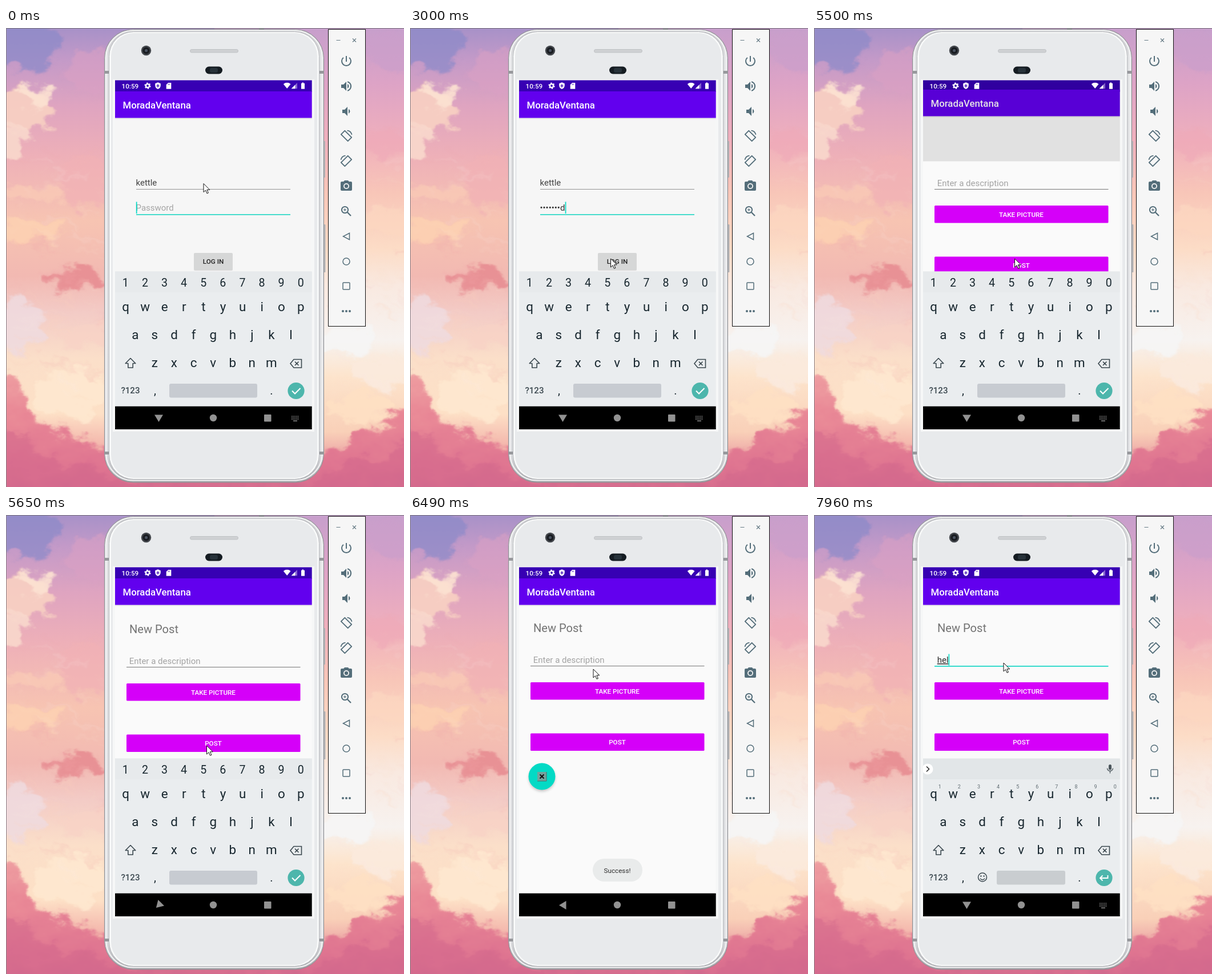
Write an HTML page that moves like this. It is 697 px wide and 804 px high and loops after 8000 ms.

```html
<!DOCTYPE html>
<html lang="en">
<head>
<meta charset="utf-8">
<title>Phone login and new post</title>
<style>
  html, body { margin: 0; width: 100%; height: 100%; overflow: hidden; background: #f4c2b4; }
  svg { display: block; width: 697px; height: 804px; }
  text { font-family: Roboto, "Liberation Sans", sans-serif; white-space: pre; }
  .med { font-weight: 500; }
  .mid { text-anchor: middle; }
</style>
</head>
<body>
<svg id="stage" viewBox="0 0 697 804" xmlns="http://www.w3.org/2000/svg"></svg>
<script>
const LOOP = 8000;
const TEAL = '#03dac5', SLATE = '#546e7a', INK = '#17262e', GLYPH = '#3b484f';

const rect = (x, y, w, h, fill, more = '') =>
  `<rect x="${x}" y="${y}" width="${w}" height="${h}" fill="${fill}" ${more}/>`;
const circle = (x, y, r, fill, more = '') =>
  `<circle cx="${x}" cy="${y}" r="${r}" fill="${fill}" ${more}/>`;
const path = (d, fill, more = '') => `<path d="${d}" fill="${fill}" ${more}/>`;
const line = (d, color, width = 1, more = '') =>
  path(d, 'none', `stroke="${color}" stroke-width="${width}" ${more}`);
const text = (x, y, size, fill, str, cls = '', more = '') =>
  `<text x="${x}" y="${y}" font-size="${size}" fill="${fill}" class="${cls}" ${more}>${str}</text>`;
const group = (id, inner) => `<g id="${id}">${inner}</g>`;
const gradient = (id, stops) => `<linearGradient id="${id}" x1="0" y1="0" x2="0" y2="1">` +
  stops.map(([o, c]) => `<stop offset="${o}" stop-color="${c}"/>`).join('') + '</linearGradient>';

function random(seed) {
  return () => (seed = (seed * 16807) % 2147483647) / 2147483647;
}

function defs() {
  return `<defs>
    ${gradient('skyL', [[0, '#a791c8'], [.07, '#c49ac8'], [.17, '#dfa4c0'], [.28, '#eeb0b8'], [.42, '#f7c4b2'],
      [.54, '#f2b9b2'], [.62, '#f3cbc6'], [.72, '#fbdfc9'], [.84, '#fde0c6'], [.92, '#f2b0a8'], [1, '#df748f']])}
    ${gradient('skyR', [[0, '#c79fcc'], [.12, '#dda3c6'], [.25, '#f0b0bc'], [.36, '#f8c6b8'], [.48, '#fcdcc6'],
      [.56, '#f9e9e0'], [.68, '#f7f2ef'], [.76, '#fde4cc'], [.88, '#f9d0b8'], [1, '#dc718f']])}
    ${gradient('hill', [[0, '#f0a5a4'], [.35, '#e98896'], [.7, '#de7390'], [1, '#c9648c']])}
    ${gradient('metal', [[0, '#c4c5c8'], [.06, '#dfe0e2'], [.94, '#dadbde'], [1, '#a5a6aa']])}
    <filter id="cloud" x="-20%" y="-20%" width="140%" height="140%" color-interpolation-filters="sRGB">
      <feGaussianBlur stdDeviation="3" result="soft"/>
      <feTurbulence type="fractalNoise" baseFrequency=".025 .035" numOctaves="4" seed="4"/>
      <feDisplacementMap in="soft" scale="55" xChannelSelector="R" yChannelSelector="G"/>
    </filter>
    <filter id="soft"><feGaussianBlur stdDeviation="2.5"/></filter>
    <clipPath id="screen"><rect x="191" y="91.5" width="344.7" height="611.5"/></clipPath>
    <clipPath id="body"><rect id="bodyClip" x="191" y="157" width="345" height="506"/></clipPath>
  </defs>`;
}

function wallpaper() {
  const clouds = [
    [5, 30, 85, 45, '#8c8ac8', .75], [150, 80, 45, 40, '#dba0c4', .6], [30, 145, 56, 40, '#f7cfc2', .95],
    [10, 200, 26, 34, '#f9d9cc', .9], [50, 118, 34, 18, '#fce3d2', .9], [140, 270, 40, 50, '#f1b1b6', .7],
    [40, 290, 60, 18, '#f9cab6', .8], [40, 355, 60, 22, '#fdd2b2', .85], [125, 442, 45, 18, '#e78a90', .85],
    [25, 525, 42, 42, '#efdbe0', .85], [140, 540, 45, 24, '#f8d2c6', .8], [115, 640, 60, 45, '#fee8d0', .9],
    [670, 40, 40, 30, '#cb9ecb', .7], [670, 200, 45, 22, '#efa9b8', .6], [665, 340, 45, 25, '#fcd8c0', .7],
    [600, 545, 50, 26, '#f6f5f5', .9], [660, 600, 50, 30, '#fbeadd', .9], [620, 665, 60, 24, '#fee0c4', .9]
  ].map(([x, y, rx, ry, c, o]) =>
    `<ellipse cx="${x}" cy="${y}" rx="${rx}" ry="${ry}" fill="${c}" opacity="${o}"/>`).join('');

  const rnd = random(71);
  let strokes = '';
  for (let i = 0; i < 70; i++) {
    const x = rnd() < .7 ? rnd() * 175 : 555 + rnd() * 142;
    const y = 200 + rnd() * 450, w = 15 + rnd() * 50;
    const c = ['#fde0cd', '#efa5a8', '#fbd0bd', '#f8e6e2'][i % 4];
    strokes += line(`M${x} ${y}q${w / 2} ${rnd() * 10} ${w} ${5 + rnd() * 18}`, c, 1 + rnd() * 4, 'opacity=".35"');
  }
  return rect(0, 0, 365, 804, 'url(#skyL)') + rect(365, 0, 332, 804, 'url(#skyR)') +
    `<g filter="url(#cloud)">${clouds}${strokes}
      ${path('M-40 590L15 610L40 670L85 705L130 722L190 750H540L590 730L640 700L700 668L740 660V850H-40Z', 'url(#hill)')}
      ${path('M-40 690L30 705L60 745L130 765L230 790V850H-40ZM530 800L600 760L740 725V850H530Z', '#d4688c', 'opacity=".55"')}
    </g>` + rect(0, 0, 697, 1, '#77727a') + rect(0, 0, 1, 804, '#8b8288');
}

function phone() {
  const bands = [75, 742].map(y => rect(172, y, 9, 5, '#97989c') + rect(548, y, 9, 5, '#97989c')).join('');
  return rect(555, 198, 4, 64, '#b5b5b8', 'rx="1"') + rect(555, 344, 4.5, 84, '#b5b5b8', 'rx="1"') +
    rect(443, 0, 9, 4, '#8d8e92') +
    rect(172.5, 2.5, 384, 793.5, 'url(#metal)', 'rx="50" stroke="#8b8c90"') +
    rect(175.5, 4.5, 378, 788, 'none', 'rx="47" stroke="#f4f4f5" stroke-width="2"') + bands +
    rect(180.5, 6.5, 368, 784, '#f8f9f9', 'rx="43" stroke="#b4b6ba"') +
    rect(184, 9, 361, 779, '#e8eaec', 'rx="40"') +
    rect(187, 90, 353, 617, '#f6f7f7') +
    circle(245.5, 39.5, 8.7, '#42464b') + circle(245.5, 39.5, 6, '#191c21') + circle(245.5, 39.5, 2.5, '#4a5360') +
    rect(322.5, 37.5, 84, 5.5, '#cfd1d3', 'rx="2.7" stroke="#b9bcbf" stroke-width=".8"') +
    rect(349, 67.5, 30, 13, '#151c22', 'rx="6.5"') + rect(357, 70, 14, 8, '#27323a', 'rx="3"');
}

function sideBar() {
  const at = (y, inner) => `<g transform="translate(584 ${y - 12})">${inner}</g>`;
  const turn = line('M2.8 9.3L9.3 2.8L21.2 14.7L14.7 21.2Z', SLATE, 1.9, 'stroke-linejoin="round"') +
    line('M13.5 2.6Q20 3.2 21.6 9.8', SLATE, 1.9);
  return rect(564.5, 2.5, 65, 520, '#f6f6f6', 'stroke="#111"') +
    line('M578.5 21.5h7M607 18.5l6 6m0-6l-6 6', '#687c86', 1.2) +
    at(58, path('M13 3h-2v10h2zM17.83 5.17l-1.42 1.42A7 7 0 1 1 7.58 6.58L6.17 5.17A9 9 0 1 0 17.83 5.17z', SLATE)) +
    at(102, path('M3 9v6h4l5 5V4L7 9zM16.5 12A4.5 4.5 0 0 0 14 8v8a4.5 4.5 0 0 0 2.5-4zM14 3.2v2.1a7 7 0 0 1 0 13.4v2.1a9 9 0 0 0 0-17.6z', SLATE)) +
    at(146, path('M18.5 12A4.5 4.5 0 0 0 16 8v8a4.5 4.5 0 0 0 2.5-4zM5 9v6h4l5 5V4L9 9z', SLATE)) +
    at(189, turn) + at(233, `<g transform="translate(24 0) scale(-1 1)">${turn}</g>`) +
    at(277, path('M9 2L7.2 4H4a2 2 0 0 0-2 2v12a2 2 0 0 0 2 2h16a2 2 0 0 0 2-2V6a2 2 0 0 0-2-2h-3.2L15 2z', SLATE) +
      circle(12, 12, 5, '#f6f6f6') + circle(12, 12, 3.2, SLATE)) +
    at(321, circle(9.5, 9.5, 5.6, 'none', `stroke="${SLATE}" stroke-width="2"`) +
      line('M13.8 13.8L20 20', SLATE, 2.3) + line('M7 9.5h5M9.5 7v5', SLATE, 1.2)) +
    at(365, line('M17.5 6.3v11.4L6.5 12z', SLATE, 1.5)) +
    at(409, circle(12, 12, 6, 'none', `stroke="${SLATE}" stroke-width="1.5"`)) +
    at(452, rect(6, 6, 12, 12, 'none', `rx="1" stroke="${SLATE}" stroke-width="1.5"`)) +
    at(496, [6, 12, 18].map(x => circle(x, 12, 2, SLATE)).join(''));
}

function statusIcons() {
  return text(202.5, 105.7, 11.7, '#fff', '10:59', 'med') +
    circle(248, 101.2, 3.1, 'none', 'stroke="#fff" stroke-width="2.4"') +
    circle(248, 101.2, 4.8, 'none', 'stroke="#fff" stroke-width="1.6" stroke-dasharray="2.5 2.526"') +
    path('M266 95.3l4.8 2v3.5c0 3-2 5.3-4.8 6.2c-2.8-.9-4.8-3.2-4.8-6.2v-3.5z', '#fff') +
    line('M266 98.3v6M263.5 101.3h5', '#3700b3', 1.3) +
    path('M284 96h5.3v10.8h-8.6v-7.5z', '#fff') + line('M284.2 97.5v2.5m2-2.5v2.5', '#3700b3', .8) +
    path('M485.8 98.3a9.5 9.5 0 0 1 12.7 0L492.2 106z', '#fff') +
    path('M510 96v10.3h-10.3z', '#fff', 'opacity=".4"') + path('M506.5 99.5v6.8h-6.8z', '#fff') +
    path('M518.5 95.5h2.5v1.2h2v10.1h-6v-10.1h1.5z', '#fff');
}

function login() {
  return rect(191, 154, 345, 509, '#f6f6f6') +
    text(227.5, 276, 15, '#444', 'kettle') + rect(228, 282, 270, 1, '#949494') +
    group('hint', text(227.5, 320, 15, '#a5a5a5', 'Password')) +
    text(227.5, 320, 15, '#333', '', '', 'id="secret"') +
    rect(228, 326, 270, 1.7, '#2bd8c6') + rect(0, 304.5, 1.7, 20.5, TEAL, 'id="secretCaret"') +
    rect(329, 395, 68, 30, '#999', 'rx="2" opacity=".3"') +
    rect(329, 394, 68, 30, '#d6d7d7', 'rx="2" id="loginButton"') + text(363, 413, 11.7, '#222', 'LOG IN', 'med mid');
}

function post() {
  const button = (y, label) => rect(211, y, 304.5, 30.5, '#d500f9', 'rx="1.5"') +
    text(363, y + 19.5, 11.7, '#fff', label, 'med mid');
  return text(216, 204.5, 20.1, '#737373', 'New Post') +
    group('ask', text(215.7, 259, 15, '#a3a3a3', 'Enter a description')) +
    text(215.7, 259, 15, '#2c2c2c', '', '', 'id="note" text-decoration="underline"') +
    rect(211, 264, 304.5, 1, '#777', 'id="noteLine"') + rect(0, 243.5, 1.6, 20, TEAL, 'id="noteCaret"') +
    button(293, 'TAKE PICTURE') + button(382.5, 'POST');
}

function fab() {
  return circle(231, 461, 23, '#000', 'opacity=".22" filter="url(#soft)"') + circle(231, 458, 23.5, TEAL) +
    rect(223, 450, 16, 16, '#74a39d') + line('M223 466h16v-16', '#4c6d69') +
    line('M227.5 454.5l7 7m0-7l-7 7', '#111', 2);
}

function keyboard() {
  const row = (keys, x, y, size) => [...keys].map((k, i) => text(x + 34.1 * i, y, size, INK, k, 'mid')).join('');
  const digits = '1234567890';
  const pin = row(digits, 209.3, 453, 19.6) + rect(286, 623, 154, 24.5, '#c7cbd1', 'rx="3"') +
    line('M501 635.5l5 5l9.5-9.5', '#fff', 2);
  const abc = rect(191, 427, 345, 36, '#e2e6e8') +
    [...digits].map((k, i) => text(220.3 + 34.1 * i, 479, 9, '#5f6b71', k, 'mid')).join('') +
    circle(199, 445, 9.5, '#fff') + line('M197 440.5l4.5 4.5l-4.5 4.5', '#333', 1.7) +
    rect(516, 437, 5, 9.5, '#4b565c', 'rx="2.5"') +
    line('M513.5 443.5a5 5 0 0 0 10 0M518.5 448.5v4', '#4b565c', 1.3) +
    circle(295, 634.5, 7.5, 'none', `stroke="${GLYPH}" stroke-width="1.5"`) +
    circle(292.4, 632.5, 1.2, GLYPH) + circle(297.6, 632.5, 1.2, GLYPH) +
    line('M291 636.5a4.5 4.5 0 0 0 8 0', GLYPH, 1.4) +
    rect(320, 623, 120, 24.5, '#c9cdd0', 'rx="3"') +
    line('M514.5 631v5h-13M505.5 631.5l-4.5 4.5l4.5 4.5', '#fff', 1.9);
  return rect(191, 426.5, 345, 236.5, '#eaedef') + rect(191, 426.5, 345, 36.5, '#e7eaec') +
    group('pin', circle(508, 635.5, 14.6, '#4db6ac') + pin) +
    group('abc', circle(508, 635.5, 14.6, '#4db6ac') + abc) +
    row('qwertyuiop', 209.5, 495.5, 22.4) + row('asdfghjkl', 226.3, 544.5, 22.4) + row('zxcvbnm', 260.3, 594, 22.4) +
    line('M218 578.5l8.8 9h-4.6v7.5h-8.4v-7.5h-4.6z', GLYPH, 1.6, 'stroke-linejoin="round"') +
    line('M504 580.5h13.5v14.5h-13.5l-6-7.25zM506 584.5l6.5 6.5m0-6.5l-6.5 6.5', GLYPH, 1.6) +
    text(218, 640, 15, GLYPH, '?123', 'med mid') + text(261, 642, 20, INK, ',', 'mid') + text(465, 642, 20, INK, '.', 'mid');
}

function nav() {
  let keys = '';
  for (let i = 0; i < 15; i++) keys += rect(500 + (i % 5) * 2.7, 679.5 + Math.floor(i / 5) * 2.6, 1.5, 1.4, '#8b8b8b');
  return rect(191, 662.7, 345, 41, '#000', 'id="navBar"') +
    path('M-7.5 -6h15l-7.5 12.5z', '#929292', 'id="back"') +
    circle(363, 683, 6.2, '#929292') + rect(452, 677, 12.5, 12.5, '#929292', 'rx="1"') +
    group('imeKey', keys + rect(503, 687.5, 7, 1.5, '#8b8b8b'));
}

const stage = document.getElementById('stage');
stage.innerHTML = defs() + wallpaper() + phone() + sideBar() + `<g clip-path="url(#screen)">
  ${rect(191, 91, 345, 572, '#fafafa')}
  ${group('login', login())}
  <g clip-path="url(#body)">${group('post', post())}</g>
  ${rect(191, 91, 345, 21, '#3700b3', 'id="status"')}
  ${group('header', rect(191, 157.5, 345, 2, '#000', 'opacity=".07"') + rect(191, 111, 345, 46.5, '#6200ee') +
    text(204.5, 141, 16.75, '#fff', 'MoradaVentana', 'med'))}
  ${rect(191, 108, 345, 125.5, '#000', 'id="shade" opacity=".1"')}
  ${statusIcons()}
  ${group('keys', keyboard())}
  ${rect(191, 464, 345, 199, '#fafafa', 'id="veil" opacity=".87"')}
  ${group('fab', fab())}
  ${group('toast', rect(320, 602, 87, 40, '#e9ebeb', 'rx="20" id="toastBox"') + text(363, 626.5, 11.7, '#2d2d2d', 'Success!', 'mid'))}
  ${nav()}</g>` +
  path('M0 0v15l3.5-3.3l2.5 5.6l2.4-1l-2.5-5.5h4.8z', '#fff', 'id="mouse" stroke="#111" stroke-linejoin="round"');

const el = id => document.getElementById(id);
const set = (id, name, value) => el(id).setAttribute(name, value);
const show = (id, on) => set(id, 'visibility', on ? 'visible' : 'hidden');
const within = (t, a, b) => t >= a && t < b;
// The value of the last step already reached.
const step = (t, list) => list.reduce((v, [at, next]) => (t >= at ? next : v), list[0][1]);

const MOUSE = [[0, [346, 272.5]], [2490, [343, 310]], [2610, [339, 364]], [2760, [345, 388]], [2880, [351, 403]],
  [3000, [351.5, 404]], [6100, [342, 365]], [6220, [313, 312]], [6360, [314, 290]], [6480, [321, 270]],
  [6610, [328, 261]], [6760, [332, 259]]];
const TYPED = [[0, 0], [550, 1], [830, 3], [950, 4], [1260, 5], [1410, 6], [1530, 7], [1930, 8]];

function drawLogin(t) {
  const n = step(t, TYPED);
  const masked = t >= 3280 ? n : Math.max(0, n - 1);
  el('secret').textContent = '•'.repeat(masked) + 'password'.slice(masked, n);
  show('hint', n === 0);
  set('secretCaret', 'x', 227.8 + el('secret').getComputedTextLength());
  show('secretCaret', step(t, [[0, true], [150, false], [550, true], [2340, false], [2880, true], [3280, false], [4040, true]]));
  set('loginButton', 'fill', within(t, 3280, 3520) ? '#c2c3c3' : '#d6d7d7');
}

function drawPost(t) {
  const note = step(t, [[0, ''], [7840, 'he'], [7960, 'hel']]);
  const focused = t >= 7030;
  set('post', 'transform', `translate(0 ${step(t, [[0, 18], [5650, 2], [5800, 0]])})`);
  set('bodyClip', 'y', t < 5650 ? 233 : 157);
  el('note').textContent = note;
  show('ask', !note);
  set('noteCaret', 'x', 215.7 + el('note').getComputedTextLength());
  show('noteCaret', within(t, 7030, 7560) || t >= 7840);
  set('noteLine', 'fill', focused ? '#16d6c5' : '#777');
  set('noteLine', 'height', focused ? 1.7 : 1);
}

function draw(t) {
  const onPost = t >= 5500, entering = within(t, 5500, 5650), leaving = within(t, 5800, 5950);
  el('login').style.display = onPost ? 'none' : '';
  el('post').style.display = onPost ? '' : 'none';
  if (onPost) drawPost(t); else drawLogin(t);

  set('header', 'transform', `translate(0 ${entering ? -3 : 0})`);
  set('status', 'fill', entering ? '#30009f' : '#3700b3');
  show('shade', entering);

  show('keys', t < 5950 || t >= 7840);
  set('keys', 'transform', `translate(0 ${step(t, [[0, 0], [5800, 41], [5950, 0], [7840, 18], [7960, 0]])})`);
  el('pin').style.display = t < 7000 ? '' : 'none';
  el('abc').style.display = t < 7000 ? 'none' : '';
  show('veil', leaving);
  show('fab', within(t, 5800, 7840));
  show('toast', within(t, 5800, 7560));
  set('toastBox', 'opacity', leaving ? .6 : 1);

  const turn = step(t, [[0, 0], [5650, 45], [5800, 90], [7680, 0]]);
  set('back', 'transform', `translate(267.5 683.5) rotate(${turn})`);
  set('back', 'fill', leaving ? '#b8b8b8' : '#929292');
  set('navBar', 'opacity', leaving ? .87 : 1);
  show('imeKey', t < 5650 || t >= 7680);

  const [x, y] = step(t, MOUSE);
  set('mouse', 'transform', `translate(${x} ${y})`);
}

const start = performance.now();
function tick() {
  draw((performance.now() - start) % LOOP);
  requestAnimationFrame(tick);
}
tick();
</script>
</body>
</html>
```
